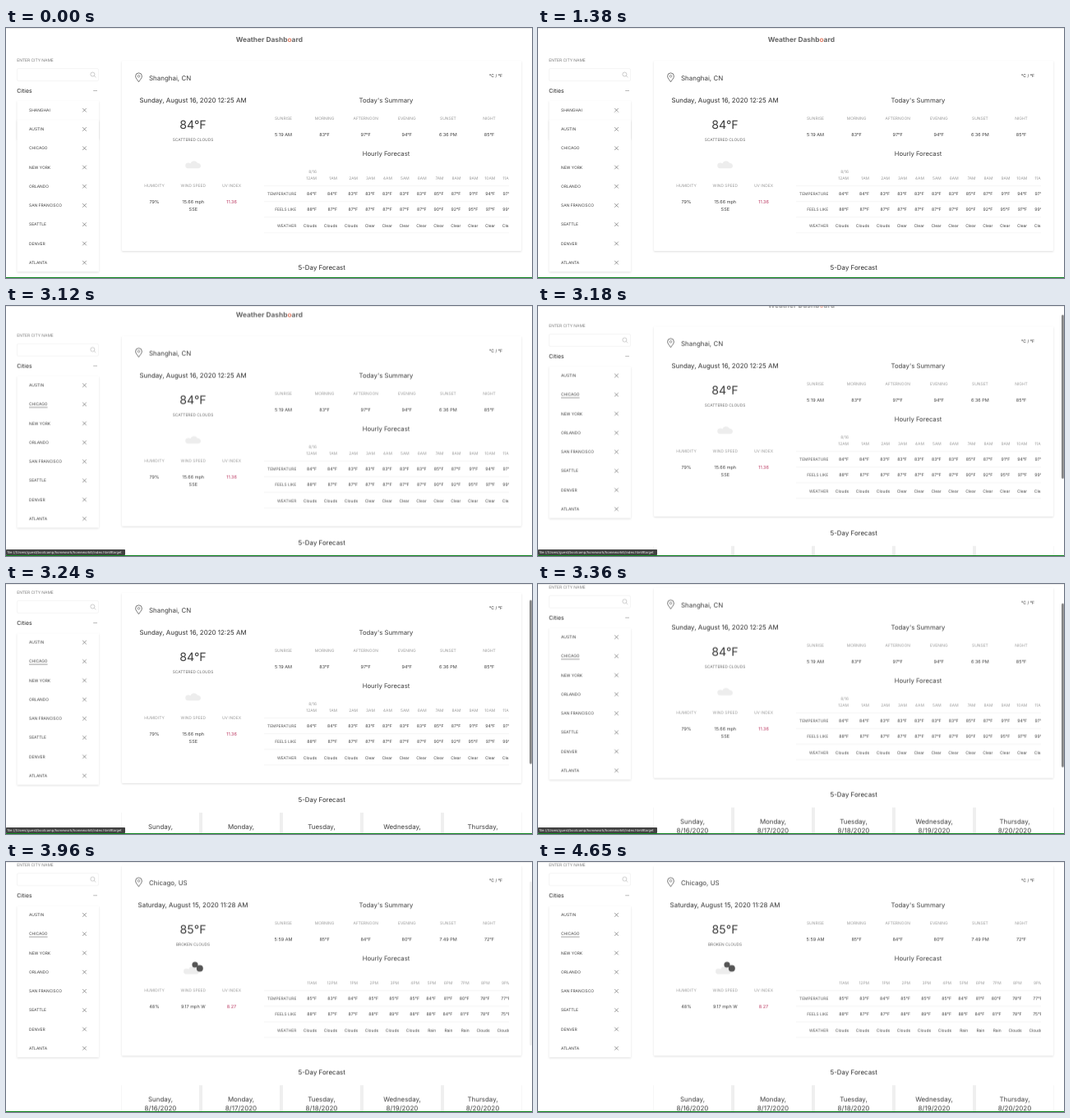
These frames come from a looping animation (640 px wide and 305 px high, 4710 ms). An HTML page:

```html
<!DOCTYPE html>
<html lang="en">
<head>
<meta charset="utf-8">
<title>Weather Dashboard</title>
<style>
  html, body { margin: 0; width: 100%; height: 100%; overflow: hidden; background: #fff; }
  svg { display: block; width: 100%; height: 100%; }
  text { font-family: Inter, "Liberation Sans", sans-serif; white-space: pre; text-rendering: geometricPrecision; }
  .panel { fill: #fff; filter: drop-shadow(0 1.4px 1.2px rgba(0, 0, 0, .13)); }
</style>
</head>
<body>
<svg id="stage" viewBox="0 0 640 305">
  <defs><clipPath id="hours"><rect x="300" y="160" width="312" height="100"/></clipPath></defs>
</svg>
<script>
const LOOP = 4710;
const CITY_STEP = 23.25;
const COLUMN = { Clouds: 25, Clear: 20.9, Rain: 20.2 };
const DARK = '#3c3c3c', MUTED = '#999', FAINT = '#efefef';
const stage = document.getElementById('stage');

function add(parent, tag, attrs = {}) {
  const el = document.createElementNS('http://www.w3.org/2000/svg', tag);
  for (const key in attrs) el.setAttribute(key, attrs[key]);
  return parent.appendChild(el);
}
const group = (parent, attrs) => add(parent, 'g', attrs);
const box = (parent, x, y, width, height, attrs) => add(parent, 'rect', { x, y, width, height, ...attrs });
const disc = (parent, cx, cy, r, attrs) => add(parent, 'circle', { cx, cy, r, ...attrs });
const path = (parent, d, attrs) => add(parent, 'path', { d, fill: 'none', stroke: '#555', 'stroke-width': .6, ...attrs });

// y is the middle of the capital letters
function text(parent, content, x, y, size, attrs) {
  const el = add(parent, 'text', { x, y: y + size * .36, 'font-size': size, fill: DARK, ...attrs });
  el.textContent = content;
  return el;
}
const centred = (parent, content, x, y, size, attrs) =>
  text(parent, content, x, y, size, { 'text-anchor': 'middle', ...attrs });
const right = (parent, content, x, y, size, attrs) =>
  text(parent, content, x, y, size, { 'text-anchor': 'end', ...attrs });

function play(el, property, steps) {
  const all = [[0, steps[0][1]], ...steps, [LOOP, steps.at(-1)[1]]];
  el.animate(all.map(([time, value]) => ({ offset: time / LOOP, [property]: value })),
    { duration: LOOP, iterations: Infinity });
}
function showBetween(el, from, to) {
  play(el, 'opacity', [
    ...(from > 0 ? [[from, 0]] : []), [from, 1],
    [to, 1], ...(to < LOOP ? [[to, 0]] : [])
  ]);
}

function cloud(parent, x, y) {
  path(parent, 'M3.5 11.5a3.4 3.4 0 0 1 .3-6.8c1.4 0 1.8.3 2.6.7a4.6 4.6 0 0 1 8.4-.6c2.6.2 4.2 1.8 4.2 3.6s-1.4 3.1-3.2 3.1z',
    { transform: `translate(${x} ${y})`, fill: '#ededed', stroke: 'none' });
}

function cityRow(parent, name, y) {
  text(parent, name, 28, y, 4.9);
  path(parent, `M93.2 ${y - 2.3}l4.6 4.6m0-4.6l-4.6 4.6`);
}

function sidebar(page) {
  text(page, 'ENTER CITY NAME', 13.3, 39.3, 4.9, { fill: '#777' });
  box(page, 13.5, 49.5, 99, 15, { rx: 1.5, fill: 'none', stroke: FAINT, 'stroke-width': .6 });
  disc(page, 105.4, 56.5, 2.5, { fill: 'none', stroke: '#aaa', 'stroke-width': .6 });
  path(page, 'M107.2 58.3l2 2', { stroke: '#aaa' });
  text(page, 'Cities', 13.3, 76.3, 6.9, { fill: '#222' });
  path(page, 'M106.2 76.5h4.8', { stroke: '#888' });

  const first = group(page);
  box(first, 13.5, 89, 99.5, 46, { class: 'panel' });
  cityRow(first, 'SHANGHAI', 100.2);
  showBetween(first, 0, 1830);

  const rest = group(page);
  box(rest, 13.5, 89, 99.5, 185, { class: 'panel' });
  ['AUSTIN', 'CHICAGO', 'NEW YORK', 'ORLANDO', 'SAN FRANCISCO', 'SEATTLE', 'DENVER', 'ATLANTA']
    .forEach((name, i) => cityRow(rest, name, 100.2 + i * CITY_STEP));
  play(rest, 'transform', [
    [1830, `translateY(${CITY_STEP}px)`], [1830, 'translateY(0px)']
  ]);

  const closeHover = path(page, 'M92 103.4h7');
  play(closeHover, 'opacity', [
    [1350, 0], [1590, 1], [1830, 1], [1830, 0], [2040, 1], [2190, 1], [2430, 0]
  ]);
  const cityHover = path(page, 'M28 127.1h22.6');
  play(cityHover, 'opacity', [[2730, 0], [2970, 1]]);
}

function weather(page, data, from, to) {
  const g = group(page);
  const label = { fill: MUTED };
  text(g, data.city, 174, 60.7, 7.95);
  centred(g, data.date, 227.5, 87.8, 7.95, { fill: '#2c2c2c' });
  centred(g, data.temp[0] + '°F', 227.5, 117.5, 14.2);
  centred(g, data.sky, 227.5, 136.7, 4.85, { fill: '#666' });
  if (data.broken) {
    cloud(g, 215.8, 161);
    disc(g, 230, 161, 3.6, { fill: '#555' });
    disc(g, 235.8, 165.4, 4, { fill: '#555' });
  } else {
    cloud(g, 218, 159.8);
  }

  ['HUMIDITY', 'WIND SPEED', 'UV INDEX'].forEach((name, i) =>
    centred(g, name, [180.5, 227.8, 274.5][i], 192.6, 4.9, label));
  centred(g, data.humidity, 180.5, 212.2, 5.5);
  data.wind.forEach((line, i) => centred(g, line, 227.8, 212.2 + i * 8.6, 5.5));
  centred(g, data.uv, 274.5, 212.2, 5.5, { fill: '#b8325c' });

  data.summary.forEach((value, i) =>
    centred(g, value, 337.5 + i * 50.1, 130.2, 5.5));

  const table = group(g, { 'clip-path': 'url(#hours)' });
  let edge = 378;
  data.temp.forEach((temp, i) => {
    const sky = data.hourSky(i);
    if (i) edge += COLUMN[sky];
    const hour = (data.startHour + i) % 24;
    const cell = (content, y, attrs) => right(table, content, edge, y, 4.9, attrs);
    if (hour === 0) cell('8/16', 175.5, label);
    cell((hour % 12 || 12) + (hour < 12 ? 'AM' : 'PM'), 183.2, label);
    cell(temp + '°F', 202.2, { 'font-size': 5.2 });
    cell(data.feels[i] + '°F', 221.6, { 'font-size': 5.2 });
    cell(sky, 240.8);
  });
  showBetween(g, from, to);
}

function mainCard(page) {
  box(page, 141, 40, 486, 232, { class: 'panel', rx: 1 });
  path(page, 'M161.5 65.8c-1.5-2.6-3.9-4.6-3.9-7a3.9 3.9 0 0 1 7.8 0c0 2.4-2.4 4.4-3.9 7z', { 'stroke-width': .8 });
  disc(page, 161.5, 58.8, 1.3, { fill: 'none', stroke: '#555', 'stroke-width': .6 });
  text(page, '°C / °F', 588, 58.6, 5.1, { fill: '#222' });
  centred(page, "Today's Summary", 462.5, 87.8, 7.75);
  ['SUNRISE', 'MORNING', 'AFTERNOON', 'EVENING', 'SUNSET', 'NIGHT'].forEach((name, i) =>
    centred(page, name, 337.5 + i * 50.1, 110.6, 4.9, { fill: MUTED }));
  centred(page, 'Hourly Forecast', 462.5, 153.2, 7.65);
  ['TEMPERATURE', 'FEELS LIKE', 'WEATHER'].forEach((name, i) =>
    right(page, name, 353.3, 202.3 + i * 19.3, 4.85, { fill: '#555' }));
  for (let i = 0; i < 4; i++) path(page, `M314 ${192.6 + i * 19.1}H612`, { stroke: FAINT });
}

function forecast(page) {
  centred(page, '5-Day Forecast', 384.2, 291.8, 7.9, { fill: '#2c2c2c' });
  box(page, 140.5, 308, 487, 120, { fill: FAINT });
  ['Sunday', 'Monday', 'Tuesday', 'Wednesday', 'Thursday'].forEach((day, i) => {
    const x = 141 + i * 98;
    box(page, x, 308, 94, 120, { fill: '#fff' });
    centred(page, day + ',', x + 47, 324.8, 7.9);
    centred(page, `8/${16 + i}/2020`, x + 47, 336.2, 8);
  });
}

const page = group(stage);
const title = centred(page, 'Weather Dashb', 320.3, 14.2, 8.35, { 'font-weight': 700, fill: '#666' });
add(title, 'tspan', { fill: '#e2806a' }).textContent = 'o';
add(title, 'tspan').textContent = 'ard';
sidebar(page);
mainCard(page);

weather(page, {
  city: 'Shanghai, CN', date: 'Sunday, August 16, 2020 12:25 AM', sky: 'SCATTERED CLOUDS',
  humidity: '79%', wind: ['15.66 mph', 'SSE'], uv: '11.36', startHour: 0,
  summary: ['5:19 AM', '83°F', '97°F', '94°F', '6:36 PM', '85°F'],
  temp: [84, 84, 83, 83, 83, 83, 83, 85, 87, 91, 94, 97],
  feels: [88, 87, 87, 87, 87, 87, 87, 90, 92, 95, 97, 99],
  hourSky: i => i < 3 ? 'Clouds' : 'Clear'
}, 0, 3390);

const chicago = {
  city: 'Chicago, US', date: 'Sunday, August 16, 2020 12:25 AM', sky: 'BROKEN CLOUDS', broken: true,
  humidity: '48%', wind: ['9.17 mph W'], uv: '8.27', startHour: 0,
  summary: ['5:19 AM', '85°F', '84°F', '80°F', '6:36 PM', '72°F'],
  temp: [85, 83, 84, 85, 85, 85, 84, 81, 80, 78, 77],
  feels: [88, 87, 87, 88, 89, 88, 88, 84, 81, 78, 75],
  hourSky: i => i > 5 && i < 9 ? 'Rain' : 'Clouds'
};
weather(page, chicago, 3390, 3750);
weather(page, {
  ...chicago, date: 'Saturday, August 15, 2020 11:28 AM', startHour: 11,
  summary: ['5:59 AM', '85°F', '84°F', '80°F', '7:49 PM', '72°F']
}, 3750, LOOP);
forecast(page);

const scroll = [
  [3060, 0], [3090, 1], [3120, 3.3], [3150, 8], [3180, 15], [3210, 22.5],
  [3240, 29], [3270, 32], [3300, 33.7], [3330, 34.8], [3360, 35.4], [3390, 35.7]
];
const moveBy = rate => scroll.map(([time, y]) => [time, `translateY(${y * rate}px)`]);
play(page, 'transform', moveBy(-1));

const scrollbar = box(stage, 637, 1, 2.8, 200, { rx: 1.4, fill: '#858585' });
play(scrollbar, 'transform', moveBy(.64));
play(scrollbar, 'opacity', [[3150, 0], [3150, 1], [3750, 1], [3990, 0]]);

const status = group(stage);
box(status, 0, 297, 145, 7, { rx: .8, fill: '#414141' });
text(status, 'file:///Users/guest/bootcamp/homework/homework6/index.html#target', 1.5, 300.6, 4.15, { fill: '#eee' });
play(status, 'opacity', [[2760, 0], [2760, 1], [3510, 1], [3660, 0]]);

box(stage, 0, 0, 640, .6, { fill: '#e0e0e0' });
box(stage, 0, 304, 640, 1, { fill: '#0f861f' });
</script>
</body>
</html>
```
